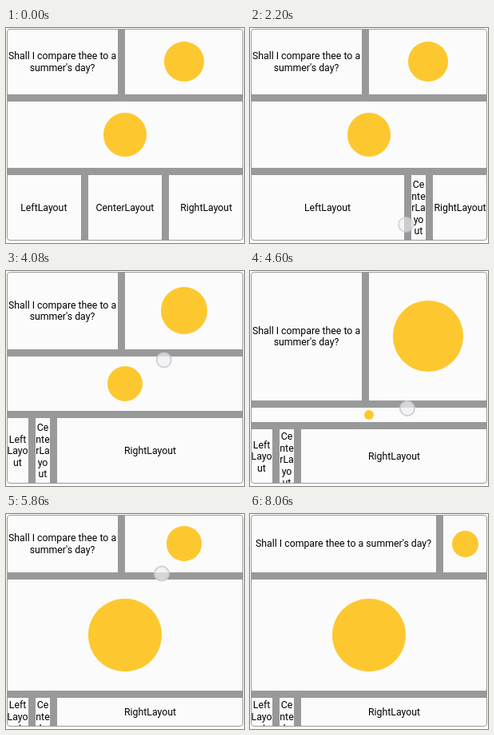
Recreate the animation shown at these times as an HTML page. Size 298 by 269 pixels, loop 9 s.

```html
<!DOCTYPE html>
<html lang="en">
<head>
<meta charset="utf-8">
<title>Resizable panes</title>
<style>
  html, body { margin: 0; width: 100%; height: 100%; overflow: hidden; background: #fff; }
  #frame {
    position: absolute; left: 1px; top: 1px; width: 296px; height: 265px;
    overflow: hidden; border-radius: 4px; background: #999;
  }
  #frame::after {
    content: ""; position: absolute; inset: 0; z-index: 1;
    border: 1px solid #999; border-radius: 4px; box-sizing: border-box;
  }
  .pane {
    position: absolute; overflow: hidden; background: #fbfbfb;
    display: flex; align-items: safe center; justify-content: center;
  }
  .pane span {
    flex: none; width: calc(100% + .8px); margin: 0 -.4px; padding: 2px 0 1px;
    text-align: center; overflow-wrap: anywhere;
    font: 12.3px/14.5px Roboto, Arial, sans-serif; color: #000;
  }
  .pane i { flex: none; border-radius: 50%; background: #fdc82f; }
  #touch {
    position: absolute; left: -10px; top: -10px; width: 20px; height: 20px;
    box-sizing: border-box; border-radius: 50%; z-index: 2;
    background: rgba(240, 240, 244, .7); border: 2px solid rgba(196, 196, 208, .75);
  }
</style>
</head>
<body>
<div id="frame">
  <div class="pane" id="quote"><span>Shall I compare thee to a summer's day?</span></div>
  <div class="pane" id="badge"><i></i></div>
  <div class="pane" id="middle"><i></i></div>
  <div class="pane" id="left"><span>LeftLayout</span></div>
  <div class="pane" id="center"><span>CenterLayout</span></div>
  <div class="pane" id="right"><span>RightLayout</span></div>
</div>
<div id="touch"></div>
<script>
const LOOP = 9000, W = 296, H = 265, BAR = 9, MIN = 18, FADE = 140;
const PUSH = BAR + MIN;
const thirdW = (W - 2 * BAR) / 3, thirdH = (H - 2 * BAR) / 3;
const $ = id => document.getElementById(id);

// stops: divider position over time; grip: finger offset from the divider's
// middle; across: finger position along the divider (both from press to release)
const drags = {
  left: { axis: 'x', press: 1150, release: 2180, grip: [-3, -2.5], across: [236, 246],
    stops: [[1290, thirdW], [2170, 192]] },
  right: { axis: 'x', press: 2400, release: 3680, grip: [-1, -1], across: [238, 243],
    stops: [[2700, 219], [3680, 54]] },
  row: { axis: 'y', press: 3900, release: 5880, grip: [10, -3], across: [198, 195],
    stops: [[3960, thirdH], [4860, 193], [4940, 193], [5860, 72]] },
  column: { axis: 'x', press: 6060, release: 7900, grip: [-2.5, -2.5], across: [52, 54],
    stops: [[6160, 139], [6660, 79], [6720, 79], [7620, 224], [7800, 232]] }
};

const clamp = u => Math.min(1, Math.max(0, u));
const mix = ([a, b], u) => a + (b - a) * clamp(u);

function position({ stops }, t) {
  const i = Math.max(1, stops.findIndex(s => s[0] > t));
  if (t >= stops[stops.length - 1][0]) return stops[stops.length - 1][1];
  const [t0, a] = stops[i - 1], [t1, b] = stops[i];
  return mix([a, b], (t - t0) / (t1 - t0));
}

function place(id, x0, y0, x1, y1, scale) {
  const pane = $(id), w = x1 - x0, h = y1 - y0;
  Object.assign(pane.style, { left: x0 + 'px', top: y0 + 'px', width: w + 'px', height: h + 'px' });
  if (scale) {
    const dot = pane.firstElementChild.style;
    dot.width = dot.height = Math.min(w, h) * scale + 'px';
  }
}

function drawTouch(t) {
  const drag = Object.values(drags).find(d => t >= d.press && t < d.release + FADE);
  const style = $('touch').style;
  if (!drag) { style.opacity = 0; return; }
  const u = (t - drag.press) / (drag.release - drag.press);
  const along = 1 + position(drag, t) + BAR / 2 + mix(drag.grip, u);
  const across = mix(drag.across, u);
  const [x, y] = drag.axis === 'x' ? [along, across] : [across, along];
  style.opacity = 1 - clamp((t - drag.release) / FADE);
  style.transform = `translate(${x}px, ${y}px)`;
}

function draw(t) {
  const column = position(drags.column, t);
  const row = position(drags.row, t);

  // A dragged divider pushes its neighbour once the pane between is minimal;
  // the neighbour then stays where it was pushed
  const lowest = position(drags.row, Math.min(t, drags.row.stops[1][0]));
  const row2 = Math.max(2 * thirdH + BAR, lowest + PUSH);
  let l = position(drags.left, t), r = Math.max(2 * thirdW + BAR, l + PUSH);
  if (t >= drags.right.press) {
    r = position(drags.right, t);
    l = Math.min(l, r - PUSH);
  }

  place('quote', 0, 0, column, row);
  place('badge', column + BAR, 0, W, row, .6);
  place('middle', 0, row + BAR, W, row2, .66);
  place('left', 0, row2 + BAR, l, H);
  place('center', l + BAR, row2 + BAR, r, H);
  place('right', r + BAR, row2 + BAR, W, H);
  drawTouch(t);
}

function tick() {
  draw(performance.now() % LOOP);
  requestAnimationFrame(tick);
}
tick();
</script>
</body>
</html>
```
